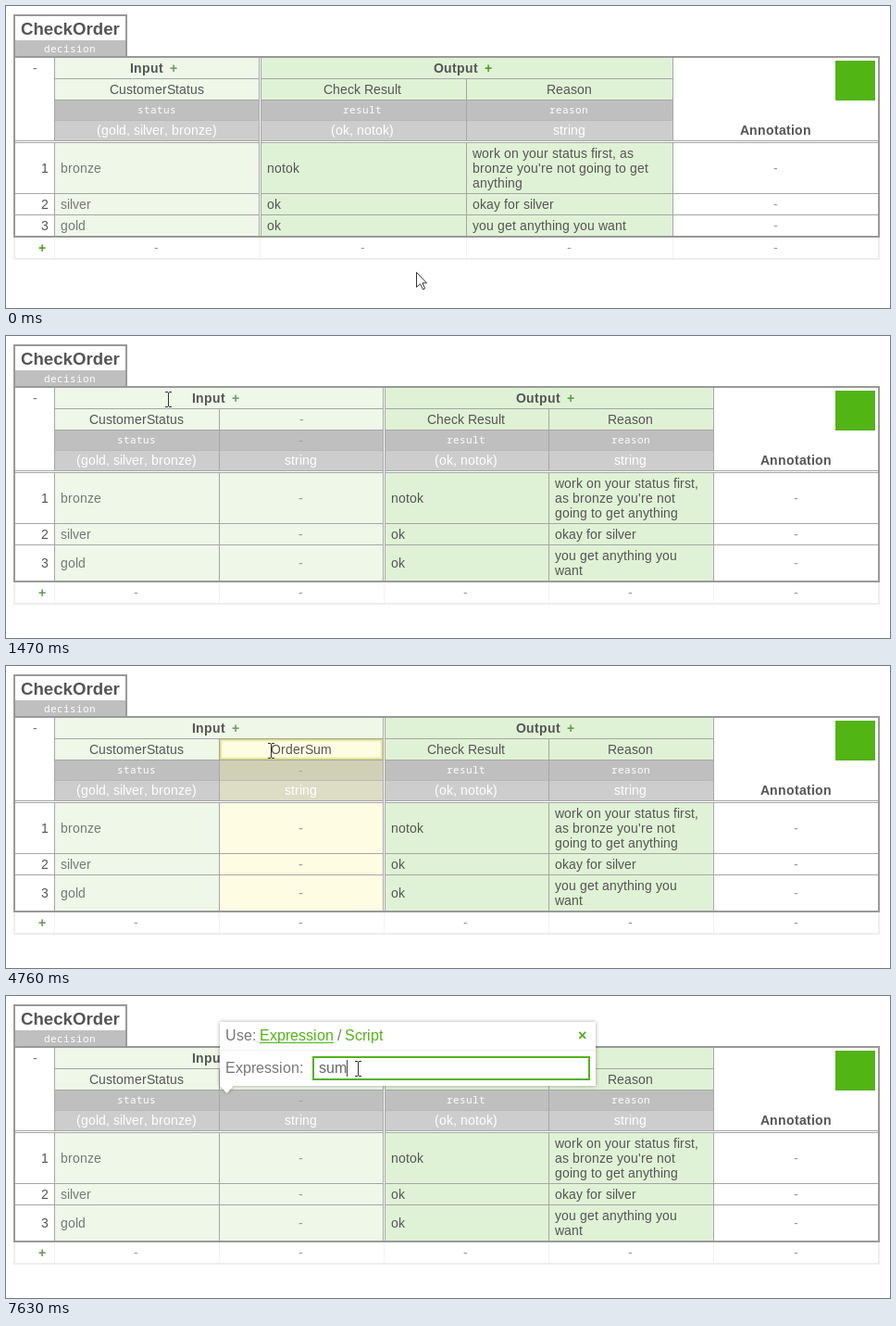
An HTML page with a canvas for the animation above (8 s loop, 955 px wide and 326 px high).

```html
<!DOCTYPE html>
<html lang="en">
<head>
<meta charset="utf-8">
<title>Decision table</title>
<style>
  html, body { margin: 0; width: 100%; height: 100%; overflow: hidden; background: #fff; }
  canvas { display: block; }
</style>
</head>
<body>
<canvas id="stage" width="955" height="326"></canvas>
<script>
const ctx = document.getElementById('stage').getContext('2d');
const LOOP = 8000, STEP = 70;
const SANS = '"Liberation Sans", Arial, sans-serif';
const BODY = `14px ${SANS}`, BOLD = `bold 14px ${SANS}`, LARGE = `16px ${SANS}`;
const MONO = '11px "Noto Sans Mono", monospace';
const GREEN = '#52b415', INK = '#555', SOFT = '#777', FAINT = '#999', LINE = '#a6a6a6', FRAME = '#999';
const FILL = { in: '#eef7e8', out: '#e0f2d5', mark: '#fefde3' };

const customer = { kind: 'in', name: 'CustomerStatus', key: 'status', type: '(gold, silver, bronze)',
  values: [['bronze'], ['silver'], ['gold']] };
const order = { kind: 'in', name: '', key: '-', type: 'string', values: [['-'], ['-'], ['-']] };
const result = { kind: 'out', name: 'Check Result', key: 'result', type: '(ok, notok)',
  values: [['notok'], ['ok'], ['ok']] };
const reason = (first, last) => ({ kind: 'out', name: 'Reason', key: 'reason', type: 'string',
  values: [first, ['okay for silver'], last] });

const narrow = {
  edges: [52, 274, 497, 720, 943], split: 1, bottom: 248, plus: '#4aa01c',
  columns: [customer, result, reason(
    ['work on your status first, as', "bronze you're not going to get", 'anything'],
    ['you get anything you want'])]
};
const wide = {
  edges: [52, 230, 408, 586, 764, 943], split: 2, bottom: 264, plus: '#6b9a5c',
  columns: [customer, order, result, reason(
    ['work on your status first,', "as bronze you're not", 'going to get anything'],
    ['you get anything you', 'want'])]
};

function rect(x, y, w, h, color) {
  ctx.fillStyle = color;
  ctx.fillRect(x, y, w, h);
}
const hline = (x0, x1, y, color = LINE, size = 1) => rect(x0, y, x1 - x0, size, color);
const vline = (x, y0, y1, color = LINE, size = 1) => rect(x, y0, size, y1 - y0, color);

function box(x0, y0, x1, y1, color, size) {
  ctx.strokeStyle = color;
  ctx.lineWidth = size;
  ctx.strokeRect(x0, y0, x1 - x0, y1 - y0);
}

// Whole-pixel advances, as in hinted screen text.
const advance = char => Math.round(ctx.measureText(char).width);
function textWidth(string, font) {
  ctx.font = font;
  return [...string].reduce((sum, char) => sum + advance(char), 0);
}
function text(string, x, y, color = INK, font = BODY) {
  ctx.font = font;
  ctx.fillStyle = color;
  for (const char of string) {
    ctx.fillText(char, x, y);
    x += advance(char);
  }
  return x;
}
const centered = (string, x, y, color, font = BODY) =>
  text(string, Math.floor(x - textWidth(string, font) / 2), y, color, font);

function groupHeader(label, center, plusColor) {
  const end = text(label, Math.floor(center - textWidth(label, BOLD) / 2 - 10.5), 72, INK, BOLD);
  text('+', end + 7, 72, plusColor, BOLD);
}

function drawTitle() {
  rect(10, 37, 120, 17, '#bfbfbf');
  box(9, 10, 130, 55, FRAME, 2);
  ctx.font = `bold 18.67px ${SANS}`;
  ctx.fillStyle = INK;
  ctx.fillText('CheckOrder', 16, 31);
  centered('decision', 69.5, 50, '#fff', MONO);
}

function drawTable({ edges, split, bottom, plus, columns }, marked) {
  const rows = [146, 202, 225, bottom];
  const last = edges.length - 2, noteX = edges[last], splitX = edges[split];
  const mid = i => (edges[i] + edges[i + 1]) / 2;
  const end = bottom + 1;

  rect(53, 56, splitX - 53, 22, FILL.in);
  rect(splitX, 56, noteX - splitX, 22, FILL.out);
  columns.forEach((col, i) => {
    const x = edges[i], w = edges[i + 1] - x, mark = marked && col === order;
    rect(x, 78, w, bottom - 78, mark ? FILL.mark : FILL[col.kind]);
    rect(x, 101, w, 22, mark ? '#d0d0b6' : '#bfbfbf');
    rect(x, 123, w, 23, mark ? '#dddcc5' : '#cdcdcd');
  });

  for (const y of [78, 101, 123]) hline(52, noteX, y, y === 123 ? '#b8b8b8' : LINE);
  for (const y of [202, 225]) hline(9, 943, y);
  edges.slice(0, -1).forEach((x, i) => {
    if (i !== split) vline(x, i === 0 || i === last ? 56 : 78, end);
    vline(x, end, end + 24, '#f2f2f2');
  });
  hline(9, 943, 145, '#fff', 3);
  hline(9, 943, 145);
  hline(9, 943, 147);
  vline(splitX - 1, 56, end, '#fff', 3);
  vline(splitX - 1, 56, end);
  vline(splitX + 1, 56, end);
  box(9, end, 943, end + 24, '#eee', 2);
  box(9, 55, 943, end, FRAME, 2);

  centered('-', 32, 72, SOFT);
  groupHeader('Input', (52 + splitX) / 2, '#6f9d68');
  groupHeader('Output', (splitX + noteX) / 2, plus === narrow.plus ? plus : '#5f9f48');
  centered('Annotation', mid(last), 139, INK, BOLD);

  columns.forEach((col, i) => {
    centered(col.name, mid(i), 95, INK);
    centered(col.key, mid(i), 116, col === order ? '#8aa88a' : '#fff', MONO);
    centered(col.type, mid(i), 139, '#fff');
  });
  for (let r = 0; r < 3; r++) {
    const base = Math.round((rows[r] + rows[r + 1]) / 2 + .5) + 5;
    const label = String(r + 1);
    text(label, 46 - textWidth(label, BODY), base);
    columns.forEach((col, i) => {
      const lines = col.values[r];
      if (lines[0] === '-') return centered('-', mid(i), base, FAINT);
      lines.forEach((line, n) => text(line, edges[i] + (i === split ? 8 : 7),
        base + (n - (lines.length - 1) / 2) * 16, col.kind === 'in' ? SOFT : INK));
    });
    centered('-', mid(last), base, FAINT);
  }
  text('+', 35, end + 17, plus, BOLD);
  for (let i = 0; i <= last; i++) centered('-', mid(i), end + 17, FAINT);
}

// The part of a word that has been typed so far.
const typed = (word, times, t) => word.slice(0, times.filter(at => t >= at).length);

function drawNameCell(t) {
  const editing = t >= 2030 && t < 5740;
  if (t >= 2450 && editing) {
    ['#d5dc7c', '#e9edac', '#f5f7cb'].forEach((color, i) =>
      box(231.5 + i, 79.5 + i, 406.5 - i, 100.5 - i, color, 1));
  }
  const word = typed('OrderSum', [2940, 3080, 3220, 3360, 3430, 3710, 4130, 4270], t);
  const end = centered(word || '-', 319.5, 95, word ? INK : FAINT);
  const blinkOff = t >= 4760 && t < 5250;
  if (editing && !blinkOff) vline(word ? end : 237, 82, 98, '#444');
}

function drawPopup(t) {
  ctx.save();
  ctx.shadowColor = 'rgba(0,0,0,.35)';
  ctx.shadowBlur = 4;
  ctx.fillStyle = '#fff';
  ctx.beginPath();
  for (const [x, y] of [[231, 28], [637, 28], [637, 97], [246, 97], [238.5, 105], [231, 97]]) ctx.lineTo(x, y);
  ctx.fill();
  ctx.restore();
  hline(231, 637, 58, '#eee');

  const linkX = text('Use: ', 237, 48, SOFT, LARGE);
  const linkEnd = text('Expression', linkX, 48, GREEN, LARGE);
  hline(linkX, linkEnd, 50, GREEN);
  text('Script', text(' / ', linkEnd, 48, SOFT, LARGE), 48, GREEN, LARGE);
  centered('×', 623, 48, GREEN, `bold 16px ${SANS}`);
  text('Expression:', 237, 83, SOFT, LARGE);

  const focused = t >= 6510;
  if (focused) box(332, 66, 630, 90, GREEN, 2);
  else {
    box(331.5, 65.5, 630.5, 90.5, '#888', 1);
    box(332.5, 66.5, 629.5, 89.5, '#ccc', 1);
  }
  const word = typed('sum', [7210, 7490, 7630], t);
  const end = text(word || 'propertyName', 338, 83, word ? '#666' : '#a9a9a9', LARGE);
  if (focused) vline(word ? end : 338, 69, 87, '#444');
}

function shape(x, y, points) {
  ctx.beginPath();
  for (const [dx, dy] of points) ctx.lineTo(x + dx + .5, y + dy + .5);
  ctx.closePath();
  ctx.fillStyle = '#fff';
  ctx.fill();
  ctx.strokeStyle = '#333';
  ctx.lineWidth = 1;
  ctx.stroke();
}
const arrow = (x, y) => shape(x, y,
  [[0, 0], [0, 16], [4, 12.5], [7, 18.5], [9, 17.5], [6.5, 11.5], [11, 11.5]]);
const hand = (x, y) => shape(x, y,
  [[5, 1], [6, 0], [7, 0], [8, 1], [8, 6], [11, 6.5], [14, 7.5], [16, 9], [16, 14], [14, 18], [14, 21],
   [6, 21], [6, 19], [3, 15], [0, 11], [1, 9.5], [3, 10], [5, 12]]);
function beam(x, y) {
  vline(x, y - 7, y + 8, '#333');
  for (const edge of [y - 8, y + 8]) {
    hline(x - 3, x, edge, '#333');
    hline(x + 1, x + 4, edge, '#333');
  }
}

function glide(t, start, end, from, to) {
  const p = Math.min(1, Math.max(0, (t - start) / (end - start)));
  const eased = p * p * (3 - 2 * p);
  return from.map((v, i) => Math.round(v + (to[i] - v) * eased));
}

function drawPointer(time) {
  const t = Math.floor(time / STEP) * STEP;
  if (t < 840) arrow(...glide(t, 0, 840, [443, 287], [188, 66]));
  else if (t < 1330) hand(...glide(t, 1050, 1190, [183, 65], [176, 69]));
  else if (t < 5320) beam(...glide(t, 1540, 1890, [175, 68], [286, 91]));
  else if (t < 6090) beam(...glide(t, 5320, 5530, [286, 91], [290, 112]));
  else beam(...glide(t, 6090, 6370, [290, 112], [380, 78]));
}

const clicks = [[840, 170, 68], [2030, 278, 78], [5740, 282, 100], [6510, 372, 65]];
function drawClick(t) {
  for (const [at, x, y] of clicks) {
    const visible = at === 5740 ? STEP : 2 * STEP;
    if (t < at || t >= at + visible) continue;
    ctx.beginPath();
    ctx.arc(x, y, 10.5, 0, 2 * Math.PI);
    ctx.strokeStyle = '#fdf000';
    ctx.lineWidth = 3;
    ctx.stroke();
  }
}

function draw(t) {
  rect(0, 0, 955, 326, '#fff');
  drawTitle();
  const expanded = t >= 1470;
  drawTable(expanded ? wide : narrow, t >= 2030 && t < 5740);
  rect(896, 59, 43, 43, GREEN);
  if (expanded) drawNameCell(t);
  if (t >= 5810) drawPopup(t);
  drawClick(t);
  drawPointer(t);
}

const start = performance.now();
function tick() {
  draw((performance.now() - start) % LOOP);
  requestAnimationFrame(tick);
}
tick();
</script>
</body>
</html>
```
